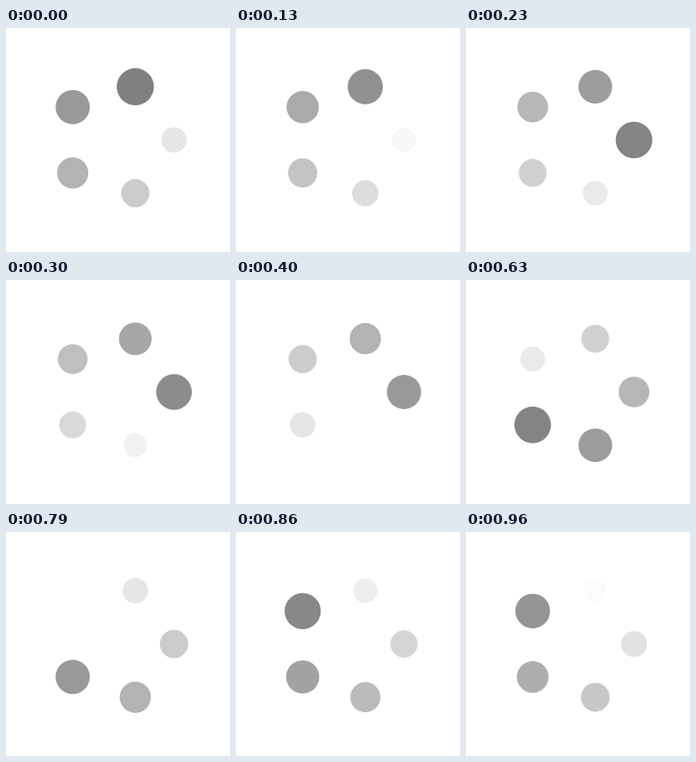
Animation of 281 by 281 pixels, one loop 0.99 s. Source, as an HTML page:

```html
<!DOCTYPE html>
<html lang="en">
<head>
<meta charset="utf-8">
<title>Spinner</title>
<style>
  html, body { margin: 0; width: 100%; height: 100%; overflow: hidden; background: #fff; }
  svg { display: block; width: 100vw; height: 100vh; }
</style>
</head>
<body>
<svg viewBox="0 0 281 281" fill="#808080"></svg>
<script>
const LOOP = 990, STEPS = 30, DOTS = 5;
const CENTER = 140.5, ORBIT = 70.25, RADIUS = 14.05, GROWTH = 0.66;
const svg = document.querySelector('svg');

// Clockwise from the upper dot, each lit a fifth of a turn after the last.
const dots = Array.from({ length: DOTS }, (_, i) => {
  const angle = (i - 1) * 2 * Math.PI / DOTS;
  const dot = document.createElementNS('http://www.w3.org/2000/svg', 'circle');
  dot.setAttribute('cx', CENTER + ORBIT * Math.cos(angle));
  dot.setAttribute('cy', CENTER + ORBIT * Math.sin(angle));
  return svg.appendChild(dot);
});

// Step starts are rounded to hundredths of a second.
const starts = Array.from({ length: STEPS }, (_, k) => Math.round(k * 3.3) * 10);

function draw(time) {
  const t = time % LOOP;
  const step = starts.filter(s => s <= t).length - 1;
  const lag = STEPS / DOTS;
  dots.forEach((dot, i) => {
    let age = step - i * lag;
    // A dot stays dark on its own boundary step and lights on the next.
    if (age < 0 || (age === 0 && i > 0)) age += STEPS;
    const glow = 1 - age / STEPS;
    dot.setAttribute('r', RADIUS * (1 + GROWTH * glow));
    dot.setAttribute('opacity', glow);
  });
}

function tick() {
  draw(performance.now());
  requestAnimationFrame(tick);
}
tick();
</script>
</body>
</html>
```
